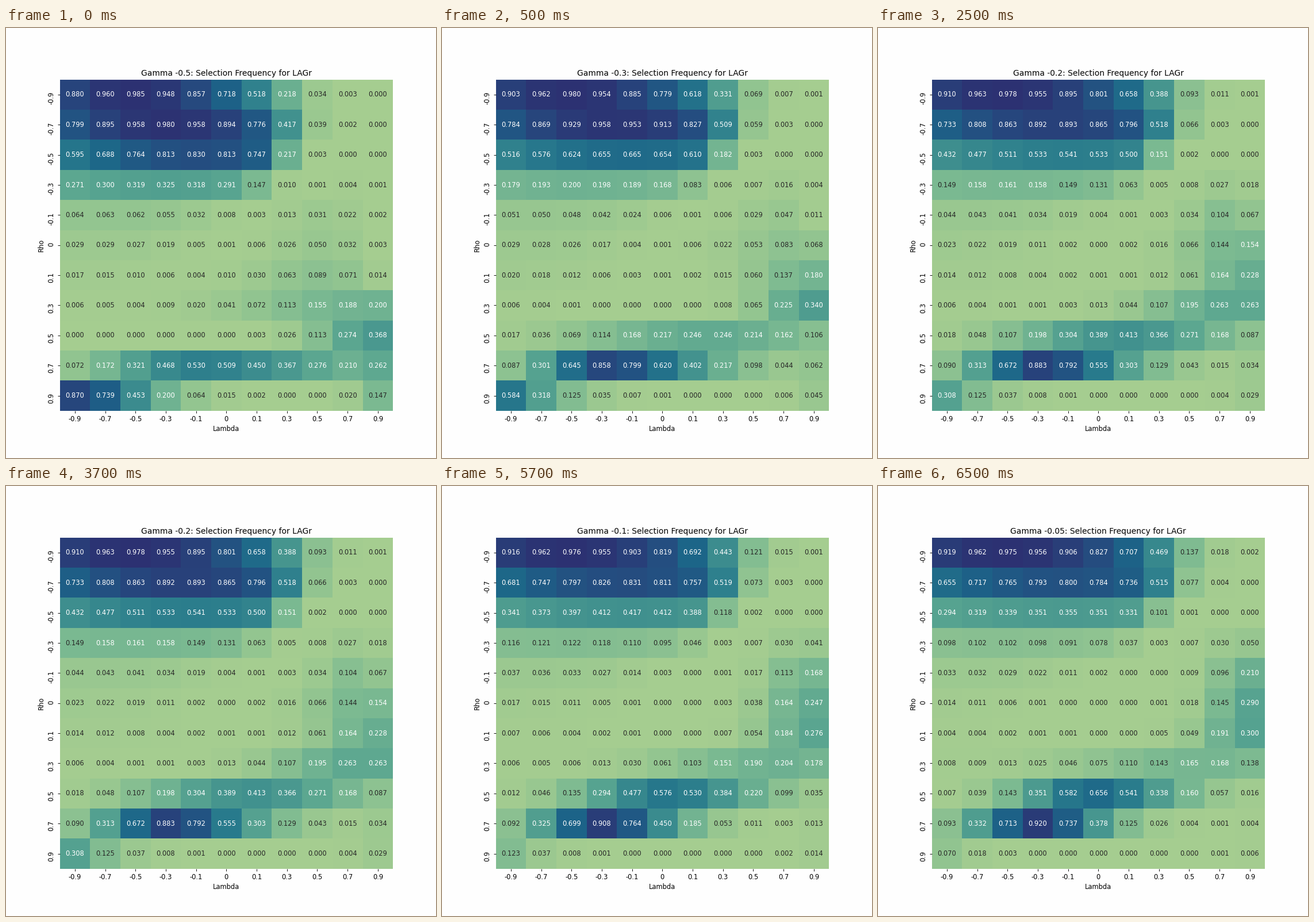
Animation of 748 by 748 pixels, one loop 8000 ms. Source, as a matplotlib script:

```python
import matplotlib.pyplot as plt
import numpy as np
from matplotlib.animation import FuncAnimation
from matplotlib.colors import LinearSegmentedColormap

SIZE = 748
INCHES = 9
STEP_MS = 500
STEPS_PER_GAMMA = 4
GAMMAS = [-0.5, -0.3, -0.2, -0.1, -0.05]
TICKS = ["-0.9", "-0.7", "-0.5", "-0.3", "-0.1", "0",
         "0.1", "0.3", "0.5", "0.7", "0.9"]
N = len(TICKS)
COLUMNS = np.arange(N)

CREST = LinearSegmentedColormap.from_list("crest", [
    "#a5cd90", "#7dba91", "#59a590", "#40908e",
    "#287a8c", "#1c6488", "#254b7f", "#2c3172"])

# A parameter is constant, a (start, end) pair, or a (start, middle, end)
# triple; it varies linearly with gamma between these keys.
KEY_GAMMAS = {1: [-0.5], 2: [-0.5, -0.05], 3: [-0.5, -0.3, -0.05]}

# Negative rho: broad plateaus cut off at an edge.
# row, height, centre, width, edge, softness of the edge
PLATEAUS = [
    (0, (0.985, 0.975), 1.9, (4, 5.5), (7, 7.5), 0.48),
    (1, (0.98, 0.96, 0.8), (3, 3.8), (4.7, 6), (7.15, 7.35), 0.33),
    (2, (0.83, 0.665, 0.355), 4, (4.9, 6.5), 6.83, 0.22),
    (3, (0.325, 0.2, 0.103), (3, 1.5), 5, 6.05, 0.3),
    (4, (0.064, 0.051, 0.033), 0, (9, 4), 4.1, 0.5),
    (5, (0.029, 0.029, 0.014), 0, (7, 1.5), 3.4, 0.4),
]

# Peaks that travel along a row as gamma grows.
# row, height, centre, width to the left, width to the right
PEAKS = [
    (3, (0.004, 0.016, 0.05), (9, 9, 10), (0.6, 1), 0.6),
    (4, (0.034, 0.048, 0.21), (8.4, 8.9, 10), (1, 0.8), 0.65),
    (5, (0.052, 0.088, 0.29), (8.3, 9.5, 10), (1.1, 1.5, 0.85), 0.7),
    (6, (0.092, 0.18, 0.3), (8.4, 10, 10), (1.6, 1.35, 1.05), 0.83),
    (6, (0.017, 0.02, 0.004), 0, 1, 2),
    (7, (0.2, 0.34, 0.17), (10, 10, 8.7), (2.8, 1.1, 2.9), 2),
    (7, 0.006, 0, 1, 1),
    (8, (0.368, 0.25, 0.66), (10, 6.5, 4.8), (1.3, 2.8, 1.6), (3.3, 1.9)),
    (9, (0.53, 0.86, 0.92), (4, 3.1, 3), (2, 1.45, 1.4), (3.5, 2.35, 1.5)),
    (9, (0.14, 0.05, 0.004), 10, 0.5, 0.5),
    (10, (0.87, 0.79, 0.58), (0, -1.36, -3.6), 1.75, 1.75),
    (10, (0.147, 0.045, 0.006), 10, 0.5, 0.5),
]


def at_gamma(gamma, key_values):
    key_values = np.atleast_1d(key_values)
    return np.interp(gamma, KEY_GAMMAS[len(key_values)], key_values)


def peak(height, centre, left, right):
    offset = COLUMNS - centre
    width = np.where(offset < 0, left, right)
    return height * np.exp(-(offset / width) ** 2 / 2)


def plateau(height, centre, width, edge, softness):
    cutoff = 1 / (1 + np.exp((COLUMNS - edge) / softness))
    return peak(height, centre, width, width) * cutoff


def frequencies(gamma):
    grid = np.zeros((N, N))
    for shape, ridges in ((plateau, PLATEAUS), (peak, PEAKS)):
        for row, *params in ridges:
            grid[row] += shape(*(at_gamma(gamma, p) for p in params))
    return grid.round(3)


plt.rcParams["font.family"] = "DejaVu Sans"
fig, ax = plt.subplots(figsize=(INCHES, INCHES), dpi=SIZE / INCHES,
                       facecolor="#fefefe")
mesh = ax.pcolormesh(np.zeros((N, N)), cmap=CREST, vmin=0, vmax=1)
ax.set(xlim=(0, N), ylim=(N, 0), xlabel="Lambda", ylabel="Rho")
centres = COLUMNS + 0.5
ax.set_xticks(centres, TICKS)
ax.set_yticks(centres, TICKS, rotation="vertical")
ax.spines[:].set_visible(False)
title = ax.set_title("")
labels = [ax.text(x, y, "", ha="center", va="center")
          for y in centres for x in centres]


def update(step):
    gamma = GAMMAS[(step + STEPS_PER_GAMMA - 1) // STEPS_PER_GAMMA]
    grid = frequencies(gamma)
    title.set_text(f"Gamma {gamma}: Selection Frequency for LAGr")
    mesh.set_array(grid / grid.max())
    for label, value in zip(labels, grid.flat):
        label.set_text(f"{value:.3f}")
        label.set_color("white" if value >= 0.15 else "0.15")
    return [title, mesh, *labels]


anim = FuncAnimation(fig, update, frames=16, interval=STEP_MS,
                     repeat=True, repeat_delay=0, blit=False)
plt.show()
```
